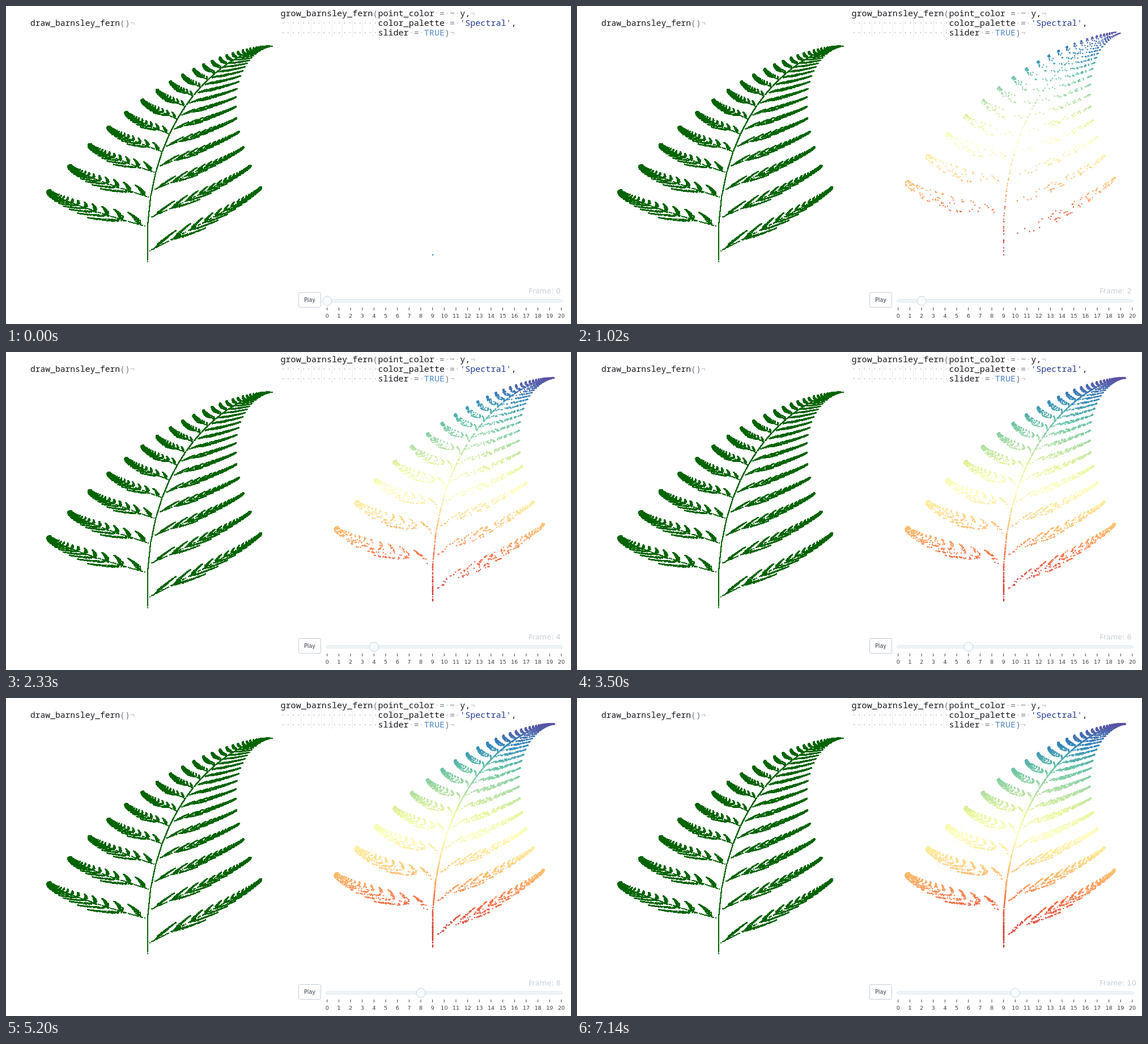
An HTML page with a canvas for the animation above (8000 ms loop, 997 px wide and 561 px high).

```html
<!DOCTYPE html>
<html lang="en">
<head>
<meta charset="utf-8">
<title>Barnsley fern</title>
<style>
html, body { margin: 0; width: 100%; height: 100%; overflow: hidden; background: #fff; }
canvas { display: block; }
</style>
</head>
<body>
<canvas id="stage" width="997" height="561"></canvas>
<script>
const W = 997, H = 561, LOOP = 8000;
const SPECTRAL = ['#c8322f', '#d8483c', '#f46d43', '#fdae61', '#fee08b', '#ffffbf',
  '#e6f598', '#abdda4', '#66c2a5', '#3288bd', '#5e4fa2'];
const GREY = '#6f7a86', FAINT = '#bcbcbc', INK = '#16161d';
const MONO = '"Noto Sans Mono", monospace', SANS = '"DejaVu Sans", sans-serif';

// start time, slider position, points grown
const STEPS = [
  [0, 0, 1],
  [470, 0.3, 150], [550, 0.75, 350], [630, 0.95, 550], [710, 1, 700],
  [920, 1.7, 1100], [1020, 2, 1500], [1160, 2, 1800], [1240, 2, 2000],
  [1470, 3, 2700], [1570, 3, 2800], [1680, 3, 2900], [1800, 3, 3000],
  [2160, 4, 3700], [2330, 4, 4000],
  [2800, 5, 5000], [3500, 6, 6000], [4280, 7, 7000],
  [5200, 8, 8000], [6130, 9, 9000], [7140, 10, 10000]
];

function seeded(seed) {
  return () => {
    seed = (seed + 0x6d2b79f5) | 0;
    let t = Math.imul(seed ^ (seed >>> 15), 1 | seed);
    t = (t + Math.imul(t ^ (t >>> 7), 61 | t)) ^ t;
    return ((t ^ (t >>> 14)) >>> 0) / 4294967296;
  };
}

// Each rule updates x first; the new x then feeds into y.
function* fern(count, seed) {
  const random = seeded(seed);
  let x = 0, y = 0;
  for (let i = 0; i < count; i++) {
    yield [x, y];
    const r = random();
    if (r < 0.01) { x = 0; y *= 0.16; }
    else if (r < 0.86) { x = 0.85 * x + 0.04 * y; y = -0.04 * x + 0.85 * y + 1.6; }
    else if (r < 0.93) { x = 0.2 * x - 0.26 * y; y = 0.23 * x + 0.22 * y + 1.6; }
    else { x = -0.15 * x + 0.28 * y; y = 0.26 * x + 0.24 * y + 0.44; }
  }
}

function layer() {
  const c = document.createElement('canvas');
  c.width = W;
  c.height = H;
  return c.getContext('2d');
}

function dot(g, x, y, r) {
  g.beginPath();
  g.arc(x, y, r, 0, Math.PI * 2);
  g.fill();
}

function spectral(y) {
  const v = Math.min(Math.max(y, 0), 9.999), i = Math.floor(v);
  const channel = (hex, k) => parseInt(hex.substr(1 + 2 * k, 2), 16);
  const mix = [0, 1, 2].map(k => {
    const a = channel(SPECTRAL[i], k), b = channel(SPECTRAL[i + 1], k);
    return Math.round(a + (b - a) * (v - i));
  });
  return `rgb(${mix})`;
}

function write(g, str, x, y, color, font, align = 'left') {
  g.font = font;
  g.fillStyle = color;
  g.textAlign = align;
  g.fillText(str, x, y);
}

// Tokens are [column, text, colour].
function code(g, x, y, size, tokens) {
  const font = `${size}px ${MONO}`;
  g.font = font;
  const step = g.measureText('0').width;
  for (const [col, str, color] of tokens) write(g, str, x + col * step, y, color, font);
}

function drawCode(g) {
  code(g, 43, 35, 14.65, [[0, 'draw_barnsley_fern', INK], [18, '()', GREY], [20, '¬', FAINT]]);
  g.fillStyle = '#eeeeee';
  for (let i = 1; i <= 9; i++) g.fillRect(Math.round(484 + i * 18.1), 21, 1, 34);
  const indent = [0, '·'.repeat(19), FAINT];
  code(g, 484.5, 17.5, 15.08, [
    [0, 'grow_barnsley_fern', INK], [18, '(', GREY], [19, 'point_color', INK],
    [30, '·', FAINT], [31, '=', GREY], [32, '·', FAINT], [33, '~', GREY],
    [34, '·', FAINT], [35, 'y,', INK], [37, '¬', FAINT]
  ]);
  code(g, 484.5, 34.5, 15.08, [
    indent, [19, 'color_palette', INK], [32, '·', FAINT], [33, '=', GREY],
    [34, '·', FAINT], [35, "'Spectral'", '#22399a'], [45, ',', INK]
  ]);
  code(g, 484.5, 51.5, 15.08, [
    indent, [19, 'slider', INK], [25, '·', FAINT], [26, '=', GREY],
    [27, '·', FAINT], [28, 'TRUE', '#4f87cc'], [32, ')', GREY], [33, '¬', FAINT]
  ]);
}

function box(g, x, y, w, h, r, fill, line) {
  g.beginPath();
  g.roundRect(x, y, w, h, r);
  g.fillStyle = fill;
  g.fill();
  g.strokeStyle = line;
  g.lineWidth = 1;
  g.stroke();
}

const sliderX = v => 566.8 + v * 20.66;

function drawControls(g) {
  box(g, 516.5, 505.5, 39, 26, 2, '#fff', '#c3ccd8');
  write(g, 'Play', 536, 522, '#36414f', `9.6px ${SANS}`, 'center');
  box(g, 564.8, 518.5, 416.7, 3.5, 1.75, '#fafcfd', '#c9dce6');
  for (let i = 0; i <= 20; i++) {
    g.fillStyle = '#444';
    g.fillRect(sliderX(i) - 0.6, 532, 1, 5);
    write(g, String(i), sliderX(i), 549.5, '#3b3b3b', `9.5px ${SANS}`, 'center');
  }
}

function buildBackdrop() {
  const g = layer();
  g.fillStyle = '#fff';
  g.fillRect(0, 0, W, H);
  g.fillStyle = '#006400';
  // whole pixels keep the leaves crisp
  for (const [x, y] of fern(50000, 7)) {
    g.fillRect(Math.round(249.7 + 82.8 * x) - 1, Math.round(450.6 - 38.1 * y) - 1, 2, 2);
  }
  drawCode(g);
  drawControls(g);
  return g.canvas;
}

const ctx = document.getElementById('stage').getContext('2d');
const backdrop = buildBackdrop();
const points = [...fern(10000, 21)];
const plot = layer();
let shown = 0;

function growTo(count) {
  if (count === shown) return;
  shown = count;
  plot.clearRect(0, 0, W, H);
  for (const [x, y] of points.slice(0, count)) {
    plot.fillStyle = count > 1 ? spectral(y) : '#1f77b4';
    dot(plot, 753 + 80.8 * x, 439 - 39.45 * y, 1.2);
  }
}

function render(t) {
  const [, pos, count] = STEPS.findLast(s => s[0] <= t);
  growTo(count);
  ctx.drawImage(backdrop, 0, 0);
  ctx.drawImage(plot.canvas, 0, 0);
  write(ctx, 'Frame: ' + Math.ceil(pos), 922.3, 506.5, '#c5cdd3', `12.8px ${SANS}`);
  ctx.fillStyle = '#f8fbfd';
  dot(ctx, sliderX(pos), 520.2, 8);
  ctx.strokeStyle = '#bfd3df';
  ctx.lineWidth = 1;
  ctx.stroke();
}

let start;
function tick(now) {
  start ??= now;
  render(Math.max(0, now - start) % LOOP);
  requestAnimationFrame(tick);
}
requestAnimationFrame(tick);
</script>
</body>
</html>
```
